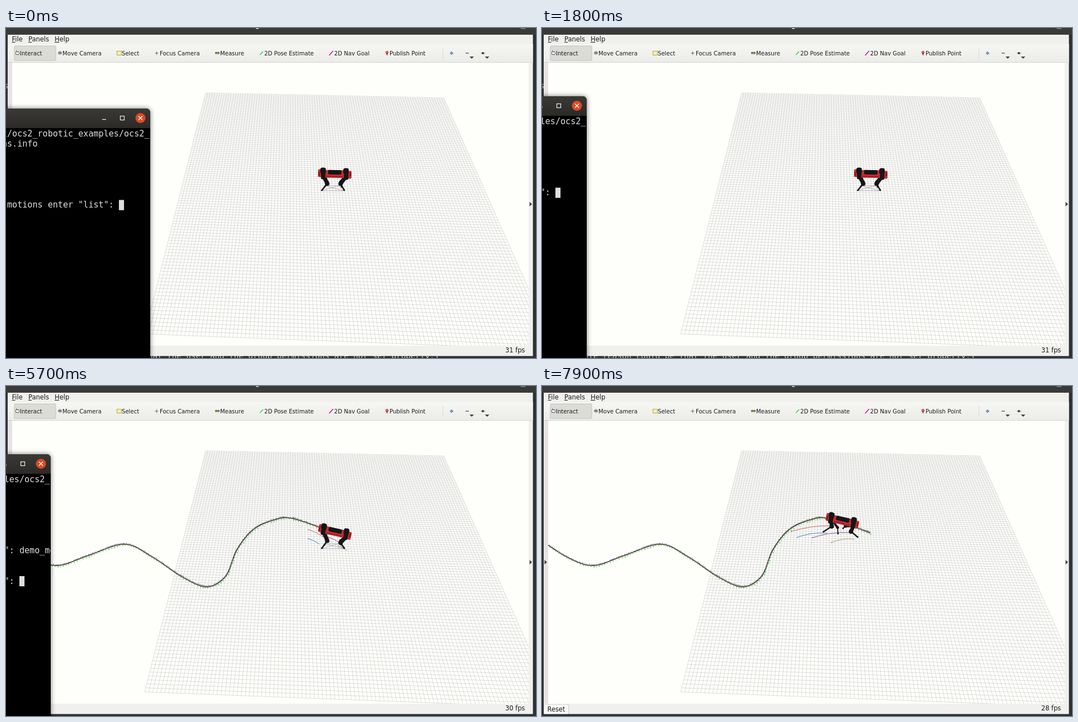
Animation of 948 by 590 pixels, one loop 8 s. Source, as an HTML page with a canvas:

```html
<!DOCTYPE html>
<html lang="en">
<head>
<meta charset="utf-8">
<title>Legged robot motion demo</title>
<style>
html, body { margin: 0; width: 100%; height: 100%; overflow: hidden; background: #2d3032; }
canvas { display: block; }
</style>
</head>
<body>
<canvas id="stage" width="948" height="590"></canvas>
<script>
const ctx = document.getElementById('stage').getContext('2d');
const SANS = '"DejaVu Sans", sans-serif', MONO = '"DejaVu Sans Mono", monospace';
const LOOP = 8000, START = 5200, WALK = 5700, RAISED = 7400;
const INK = '#1a1a1a', BLACK = '#161618', RED = '#c92c31', VIEW = '#fefffb', PANEL = '#f0f0ed';

const clamp = k => Math.min(1, Math.max(0, k));
const progress = (t, from, length) => clamp((t - from) / length);
const noise = n => Math.abs(Math.sin(n * 127.1) * 43758.5) % 1;

function rect(x, y, w, h, color) {
  ctx.fillStyle = color;
  ctx.fillRect(x, y, w, h);
}
function rounded(x, y, w, h, r, color) {
  ctx.fillStyle = color;
  ctx.beginPath();
  ctx.roundRect(x, y, w, h, r);
  ctx.fill();
}
function line(points, color, width = 1) {
  ctx.strokeStyle = color;
  ctx.lineWidth = width;
  ctx.beginPath();
  points.forEach(([x, y]) => ctx.lineTo(x, y));
  ctx.stroke();
}
function poly(points, color) {
  ctx.fillStyle = color;
  ctx.beginPath();
  points.forEach(([x, y]) => ctx.lineTo(x, y));
  ctx.fill();
}
function disc(x, y, r, color) {
  ctx.fillStyle = color;
  ctx.beginPath();
  ctx.arc(x, y, r, 0, 7);
  ctx.fill();
}
function text(s, x, y, size, color = INK, family = SANS) {
  ctx.font = size + 'px ' + family;
  ctx.fillStyle = color;
  ctx.fillText(s, x, y);
}
function clipped(x, y, w, h, draw) {
  ctx.save();
  ctx.beginPath();
  ctx.rect(x, y, w, h);
  ctx.clip();
  draw();
  ctx.restore();
}

// Perspective map of the unit square onto the ground grid.
function ground(u, v) {
  const [x0, y0, x1, y1, x2, y2, x3, y3] = [357, 116, 783, 125, 983, 575, 248, 547];
  const sx = x0 - x1 + x2 - x3, sy = y0 - y1 + y2 - y3;
  const ax = x1 - x2, ay = y1 - y2, bx = x3 - x2, by = y3 - y2;
  const den = ax * by - bx * ay;
  const g = (sx * by - bx * sy) / den, h = (ax * sy - sx * ay) / den;
  const w = g * u + h * v + 1;
  return [
    ((x1 - x0 + g * x1) * u + (x3 - x0 + h * x3) * v + x0) / w,
    ((y1 - y0 + g * y1) * u + (y3 - y0 + h * y3) * v + y0) / w
  ];
}
function grid() {
  const n = 100, color = 'rgba(160,160,164,.43)';
  for (let i = 0; i <= n; i++) {
    line([ground(i / n, 0), ground(i / n, 1)], color, .8);
    line([ground(0, i / n), ground(1, i / n)], color, .8);
  }
}

// Reference path: a smooth curve through key points, sampled evenly.
const bends = [
  [-10, 270], [45, 306], [92, 321], [145, 304], [212, 283], [262, 306], [318, 343],
  [360, 359], [393, 340], [413, 293], [442, 257], [478, 240], [513, 237], [588, 263]
];
function spline(p, step) {
  const at = i => p[Math.min(p.length - 1, Math.max(0, i))];
  const out = [];
  for (let i = 0; i < p.length - 1; i++) {
    const [a, b, c, d] = [at(i - 1), at(i), at(i + 1), at(i + 2)];
    const n = Math.round(Math.hypot(c[0] - b[0], c[1] - b[1]) / step);
    for (let j = 0; j < n; j++) {
      const k = j / n;
      out.push(b.map((v, q) => v + k / 2 * (c[q] - a[q] +
        k * (2 * a[q] - 5 * v + 4 * c[q] - d[q] + k * (3 * v - a[q] - 3 * c[q] + d[q])))));
    }
  }
  return out;
}
const route = spline(bends, 2.6);
function path() {
  line(route, '#2e2a2a', 1.3);
  route.forEach(([x, y], i) => {
    const r = noise(i);
    line([[x, y], [x + r - .5, y - 1.5 - 1.6 * r]], i % 3 ? '#26262c' : '#3838a8', .8);
    if (i % 2) line([[x - 1.5, y - .5], [x + 1, y + .5]], '#a83a3a', .8);
    else rect(x + r, y + 1, 1.3, 1.4 + 1.6 * r, '#35cf35');
  });
}

// Body pose: it leans first, then speeds up along the path.
function bodyAt(t) {
  const gone = progress(t, WALK, 2200) ** 3;
  return { x: 588 - 51 * gone, y: 262 - 20 * gone, tilt: .02 + .2 * progress(t, START, 500), gone };
}
function footPlans(t) {
  const { x, y, gone } = bodyAt(t);
  const reach = progress(t, START, 1200), heading = .46 - .6 * gone;
  const plans = [['#3a7fb5', -27, 21, 54], ['#c4584f', -20, 8, 72], ['#7e3a8e', 12, 20, 66], ['#a38f4a', 22, 32, 42]];
  for (const [color, dx, dy, length] of plans) {
    const ex = -length * reach * Math.cos(heading), ey = -length * reach * Math.sin(heading);
    ctx.strokeStyle = color;
    ctx.lineWidth = .9;
    ctx.beginPath();
    ctx.moveTo(x + dx, y + dy);
    ctx.quadraticCurveTo(x + dx + ex / 2, y + dy + ey / 2 - 6 * reach, x + dx + ex, y + dy + ey);
    ctx.stroke();
    disc(x + dx + ex, y + dy + ey, .9, color);
  }
}
// Trot: diagonal legs swing together, knees bend towards the body's middle.
function leg(t, side, near, tilt) {
  const stride = progress(t, WALK, 600);
  const swing = stride * Math.sin((t - WALK) / 1000 * 2 * Math.PI + (side < 0 === near ? 0 : Math.PI));
  const hip = [side * (near ? 20 : 17), 4 + side * 20 * Math.sin(tilt)];
  const foot = [
    side * (near ? 20 : 15) - 3 - 11 * swing,
    (near ? 28 : 22) - 10 * Math.max(0, swing)
  ];
  const knee = [
    (hip[0] + foot[0]) / 2 - side * (near ? 8 : 4),
    hip[1] * .4 + foot[1] * .6 - 2
  ];
  line([hip, knee], BLACK, near ? 6.5 : 4);
  disc(...knee, near ? 4 : 2.6, BLACK);
  line([knee, foot], BLACK, near ? 2.5 : 1.8);
  disc(...foot, 1.4, BLACK);
}
function robot(t) {
  const { x, y, tilt } = bodyAt(t);
  ctx.save();
  ctx.translate(x, y);
  ctx.lineCap = ctx.lineJoin = 'round';
  if (t < 6000) {
    line([[-25, 29], [16, 29], [7, 20], [-18, 20], [16, 29]], 'rgba(90,70,100,.5)', .7);
    line([[-25, 29], [7, 20]], 'rgba(90,70,100,.5)', .7);
  }
  for (const near of [false, true]) for (const side of [-1, 1]) leg(t, side, near, tilt);
  ctx.rotate(tilt);
  rounded(-30, -9, 13, 14, 2, RED);
  rounded(-17, -8, 36, 14, 2, RED);
  rounded(23, -7, 7, 14, 2, RED);
  for (const hx of [-21, 20]) {
    rounded(hx - 5, -12, 10, 11, 4, BLACK);
    rounded(hx - 3.5, -6, 8, 15, 3, BLACK);
  }
  rounded(-12, -8, 24, 8, 2, BLACK);
  line([[-14, 3.5], [14, 3.5]], '#7d1a1d', 1.2);
  for (const ex of [-28.5, 27]) rect(ex, -4, 1.5, 7, '#5c1416');
  ctx.restore();
}

function icons() {
  rounded(17, 42, 7, 6, 2, '#555');
  rounded(18, 43, 5, 4, 1, '#fff');
  line([[19, 43], [19, 40]], '#555');
  rounded(93, 42, 7, 5, 1, '#9a9d9f');
  disc(96.5, 44.5, 1.6, '#555');
  line([[96.5, 40], [96.5, 49]], '#aaa', .8);
  rect(198.5, 41.5, 8, 7, '#f5eeb0');
  ctx.strokeStyle = '#a99b3a';
  ctx.strokeRect(198.5, 41.5, 8, 7);
  line([[266, 45], [273, 45]], '#a2a2a2', .9);
  line([[269.5, 41], [269.5, 49]], '#a2a2a2', .9);
  disc(269.5, 45, 1.8, '#888');
  rect(374, 43, 8, 3.5, '#8a8256');
  line([[374, 43.5], [382, 43.5]], '#55523a', .8);
  line([[454, 48], [460, 42]], '#34d848', 1.6);
  line([[578, 49], [585, 41]], '#c020b0', 1.6);
  disc(681.5, 43.5, 2.5, '#b8302c');
  poly([[679.3, 44.5], [683.7, 44.5], [681.5, 49.5]], '#b8302c');
  disc(681.5, 43.3, .9, '#fff');
  line([[781.5, 36], [781.5, 55]], '#dadad6');
  line([[794, 45], [800, 45]], '#6c8fbb', 2.2);
  line([[797, 42], [797, 48]], '#6c8fbb', 2.2);
  line([[822, 45], [828, 45]], '#6c8fbb', 2);
  line([[849.5, 45], [857, 45]], '#aaa', 2.2);
  disc(853, 45, 1.9, '#333');
  for (const x of [833, 860.5]) poly([[x - 4, 51], [x + 4, 51], [x, 55]], '#444');
}

function viewer(t) {
  rect(0, 0, 948, 590, '#2d3032');
  rect(0, 0, 948, 12, '#3a3a39');
  if (t < START) {
    clipped(0, 90, 5, 20, () => text('s', -4, 108, 14, '#aaa', MONO));
    const note = 'possible reason could be that the user and the group permissions are not set properly.)';
    clipped(0, 586, 948, 4, () => {
      ctx.textAlign = 'right';
      text(note, 775, 590.5, 14.2, '#c8c8c8', MONO);
      ctx.textAlign = 'left';
    });
  }
  rect(447, 0, 5, 1.5, '#ddd');
  rounded(920, -3, 10, 5, 3, '#777');
  rect(3, 12, 939.5, 574.5, PANEL);
  for (const [label, x, w] of [['File', 10.5, 6], ['Panels', 40, 6], ['Help', 87, 8]]) {
    text(label, x, 24, 11.5);
    rect(x, 25, w, 1, INK);
  }

  const bar = ctx.createLinearGradient(0, 29, 0, 62);
  bar.addColorStop(0, '#f6f6f3');
  bar.addColorStop(1, '#ebebe7');
  rect(3, 29, 939.5, 33, bar);
  rounded(14.5, 31.5, 75, 27, 2, '#c2c2bd');
  rounded(15.5, 32.5, 73, 25, 1, '#dcdcd7');
  const tools = {
    'Interact': 25, 'Move Camera': 101, 'Select': 207, 'Focus Camera': 275, 'Measure': 383,
    '2D Pose Estimate': 462, '2D Nav Goal': 587, 'Publish Point': 686
  };
  for (const label in tools) text(label, tools[label], 48.7, 10.1);
  icons();

  rect(3, 62, 8, 506, '#e6e3e2');
  rect(3, 61, 939.5, 1, '#d5d5d1');
  rect(11, 62, 924, 506, VIEW);
  clipped(11, 62, 924, 506, () => {
    grid();
    if (t >= START) {
      path();
      footPlans(t);
    }
    robot(t);
  });
  for (const x of [4.5, 936.5]) poly([[x, 311], [x + 4.5, 315], [x, 319]], '#444');
  rounded(3.5, 569.5, 45, 17, 2, '#c6c6c2');
  rounded(4, 570, 43.5, 16, 2, '#f7f7f5');
  text('Reset', 9.5, 582, 11.4);
  text((t < START ? 31 : t < 6500 ? 30 : 28) + ' fps', 893, 580, 11.4);
}

// Terminal: dragged left in two moves, then typed into.
const keyTimes = [2500, 2700, 2800, 2900, 3600, 3900, 4000];
function terminal(t) {
  const pull = progress(t, 1200, 300), settle = progress(t, 1600, 200);
  const right = Math.round(258 - 146 * pull ** .87 - 32 * settle);
  const top = Math.round(144 - 24 * pull ** 1.26 + 2 * settle);
  const cell = 9.09, left = right - 256 - cell;
  ctx.save();
  ctx.shadowColor = 'rgba(0,0,0,.55)';
  ctx.shadowBlur = 8;
  rounded(-40, top, right + 40, 600, [0, 7, 0, 0], '#000');
  ctx.restore();
  const bar = ctx.createLinearGradient(0, top, 0, top + 35);
  bar.addColorStop(0, '#3a3935');
  bar.addColorStop(1, '#2b2a27');
  rounded(-40, top, right + 40, 35, [0, 7, 0, 0], bar);

  const x = right - 17.5, y = top + 17;
  disc(x, y, 9, '#de4a24');
  for (const d of [-3.5, 3.5]) line([[x - 3.5, y - d], [x + 3.5, y + d]], '#fff', 1.3);
  ctx.strokeStyle = '#eee';
  ctx.lineWidth = 1.2;
  ctx.strokeRect(right - 53.5, y - 3.5, 7, 7);
  line([[right - 86, y + 2.5], [right - 79, y + 2.5]], '#eee', 1.3);

  clipped(0, top + 35, right, 600, () => {
    const row = (s, r) => text(s, left, top + 50.3 + 18.14 * r, 15.1, '#dedede', MONO);
    const prompt = ' motions enter "list": ';
    const typed = 'demo_mo'.slice(0, keyTimes.filter(k => k <= t).length);
    const sent = t >= START;
    row('t/ocs2_robotic_examples/ocs2_', 0);
    row('ns.info', 1);
    row(prompt + typed, 7);
    if (sent) row(prompt, 10);
    const col = prompt.length + (sent ? 0 : typed.length);
    rect(left + col * cell, top + 163.5 + (sent ? 54.4 : 0), cell, 18.2, '#dedede');
  });
}

function frame(now) {
  const t = Math.floor((now % LOOP) / 100) * 100;
  viewer(t);
  if (t < RAISED) terminal(t);
  requestAnimationFrame(frame);
}
requestAnimationFrame(frame);
</script>
</body>
</html>
```
